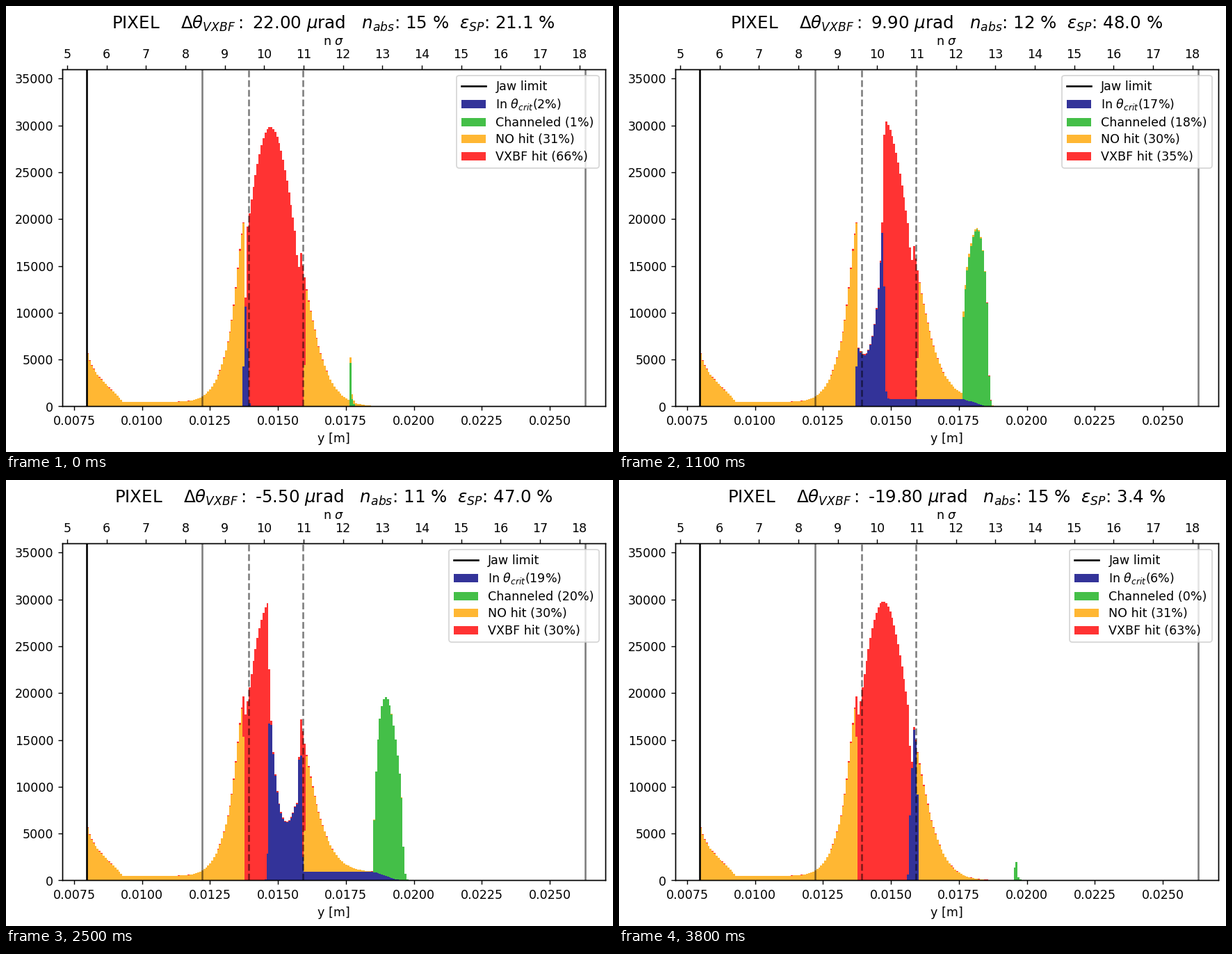
These frames come from a looping animation (873x641 px, 3900 ms). A matplotlib script:

```python
import numpy as np
import matplotlib.pyplot as plt
from matplotlib.animation import FuncAnimation

W, H, DPI = 873, 641, 126
FRAMES = 39
BINS = 250
JAW = 0.007965
SIGMA = 0.0014493
XLIM = np.array([0.0070524, 0.027033])
COLORS = ["navy", "xkcd:green", "orange", "red"]

bins = np.arange(BINS)
edges = JAW + np.arange(BINS + 1) * 7.2632e-5

# The crystal covers the bins between these two positions
CRYSTAL = 79.78, 110.68
# Last position where particles can be channeled
EXIT = 107.4
# Distance in bins between a channeled particle's start and its new place
SHIFT = 53


def bell(center, width):
    return np.exp(-0.5 * ((bins - center) / width) ** 2)


def beam_profile():
    left = bins < CRYSTAL[0]
    core = 29800 * bell(92.5, np.where(bins < 92.5, 12.24, 13))
    tail = 215 * np.clip(18 - bins, 0, None) + 1300 * np.exp(-bins / 2)
    halo = left * (500 + tail + 3200 * bell(78, 2.45))
    shoulder = (bins > EXIT) * 1700 * bell(108, 14)
    counts = core + halo + shoulder
    counts[106:108] *= 0.93
    return counts


base = beam_profile()
covered = np.minimum(np.clip(bins + 1 - CRYSTAL[0], 0, 1),
                     np.clip(CRYSTAL[1] - bins, 0, 1))
hit = np.maximum(covered, np.where(bins < 144, 0.01, 0.5))
active = (bins > CRYSTAL[0]) * np.clip(EXIT - bins, 0, 1)

smear = np.append(np.zeros(SHIFT), [0.77, 0.13, 0.04])
trail = np.full(SHIFT, 0.0037)


def spread(counts, kernel):
    return np.convolve(counts, kernel)[:BINS]


def layers(angle):
    """Counts of the four stacked groups for one crystal angle."""
    dist = bins + 0.5 - (95 - 1.003 * angle)
    chance = 0.77 * np.sqrt(np.clip(1 - (dist / 8.45) ** 2, 0, None))
    lost = base * active * chance
    rest = base * hit - lost
    inside = 0.985 / (1 + np.exp(np.clip((abs(dist) - 8.35) / 0.3, -50, 50)))
    critical = rest * inside * (covered > 0)
    return [critical + spread(lost, trail), spread(lost, smear),
            base * (1 - hit), rest - critical]


# Key points of the readouts; the other percentages follow from these
STEPS = [0, 7, 14, 21, 25, 33, 38]
CRITICAL = [2, 10.4, 21.49, 21.1, 19.3, 11, 6]
CHANNELED = [1, 10.6, 23, 23, 20.3, 6, 0]
EFFICIENCY = [21.1, 47.2, 48.6, 48.6, 47, 30.4, 3.4]
NAMES = [r"In $\theta_{crit}$", "Channeled ", "NO hit ", "VXBF hit "]


def readouts(step):
    critical, channeled, efficiency = (
        np.interp(step, STEPS, row) for row in (CRITICAL, CHANNELED, EFFICIENCY))
    missed = 31 - 0.036 * channeled
    shares = critical, channeled, missed, 100 - critical - channeled - missed
    return shares, 15 - 0.18 * channeled, efficiency


fig = plt.figure(figsize=((W + 0.01) / DPI, (H + 0.01) / DPI), dpi=DPI)
ax = fig.add_axes([80.5 / W, 1 - 575.5 / H, 781 / W, 484.5 / H])

shapes = [ax.stairs(np.zeros(BINS), edges, baseline=np.zeros(BINS), fill=True,
                    color=c, alpha=0.8, lw=0) for c in COLORS]
jaw = ax.axvline(JAW, color="black", lw=1.5)
for x, style in ((0.012214, "-"), (0.026316, "-"),
                 (0.013919, "--"), (0.015927, "--")):
    ax.axvline(x, color="black", alpha=0.5, ls=style, lw=1.5)

ax.set_xlim(XLIM)
ax.set_ylim(0, 36000)
ax.set_xticks(np.arange(0.0075, 0.0251, 0.0025))
ax.set_xlabel("y [m]")
top = ax.twiny()
top.set_xlim(XLIM / SIGMA)
top.set_xticks(range(5, 19))
top.set_xlabel(r"n $\sigma$", labelpad=2.7)
title = ax.set_title("", fontsize=14)

swatches = [plt.Rectangle((0, 0), 1, 1, fc=c, alpha=0.8, lw=0) for c in COLORS]
legend = ax.legend([jaw] + swatches, ["Jaw limit"] + NAMES,
                   loc="upper right", labelspacing=0.375)


def update(step):
    angle = (220 - 11 * step) / 10
    floor = np.zeros(BINS)
    for shape, counts in zip(shapes, layers(angle)):
        shape.set_data(floor + counts, edges, floor)
        floor = floor + counts
    shares, absorbed, efficiency = readouts(step)
    for text, name, share in zip(legend.get_texts()[1:], NAMES, shares):
        text.set_text(f"{name}({share:.0f}%)")
    title.set_text(
        rf"PIXEL    $\Delta\theta_{{VXBF}}:$ {angle:.2f} $\mu$rad   "
        rf"$n_{{abs}}$: {absorbed:.0f} %  "
        rf"$\varepsilon_{{SP}}$: {efficiency:.1f} %")
    return shapes


anim = FuncAnimation(fig, update, frames=FRAMES, interval=100, repeat=True,
                     repeat_delay=0, blit=False)
plt.show()
```
